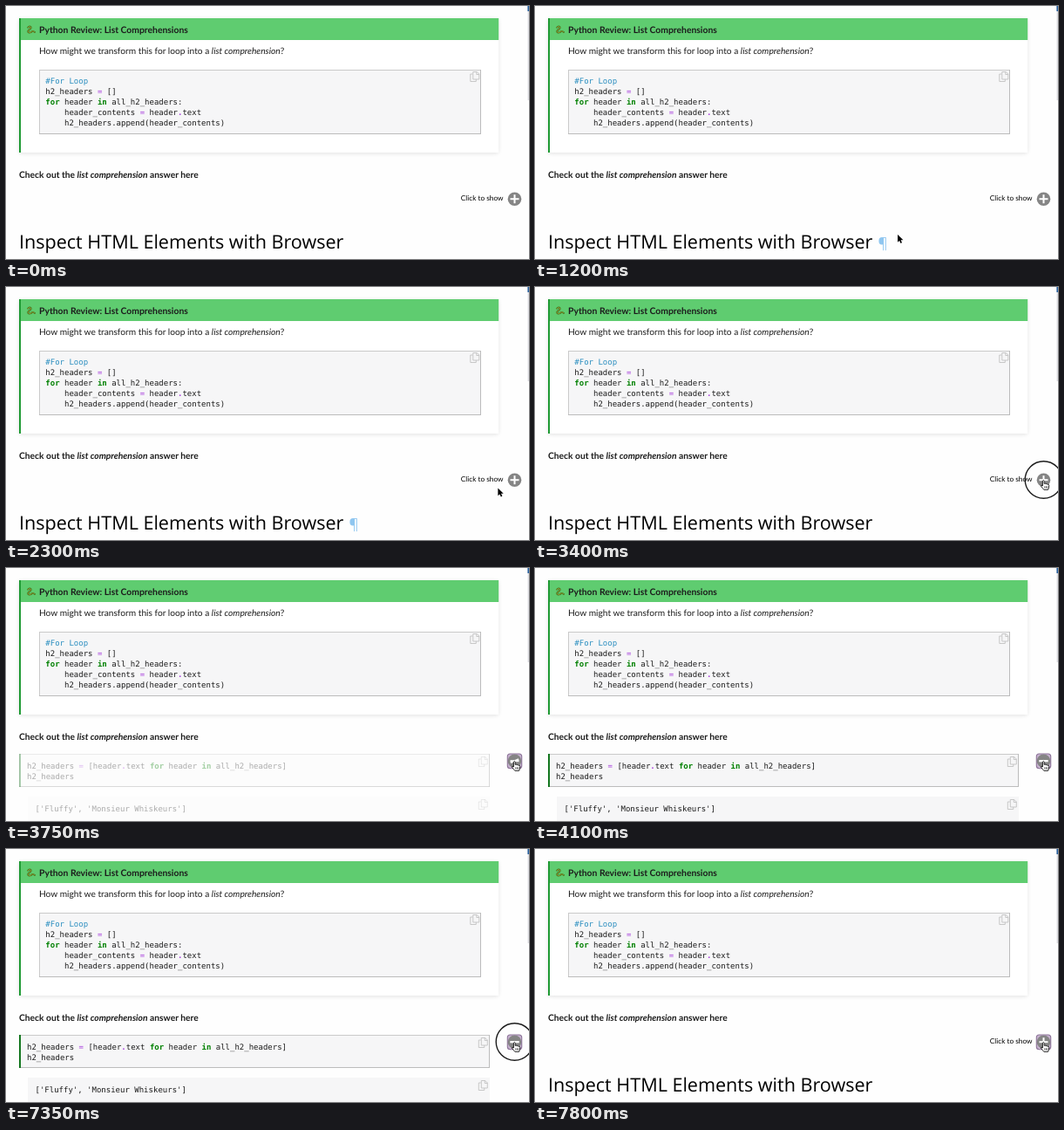
An HTML page with a canvas that plays this animation: 600 px wide and 290 px high, repeating every 8000 ms.

```html
<!DOCTYPE html>
<html lang="en">
<head>
<meta charset="utf-8">
<title>List comprehensions</title>
<style>
html, body { margin: 0; width: 100%; height: 100%; overflow: hidden; background: #fefefe; }
canvas { display: block; width: 600px; height: 290px; }
</style>
</head>
<body>
<canvas id="stage"></canvas>
<script>
const W = 600, H = 290, LOOP = 8000;
const canvas = document.getElementById('stage');
const ctx = canvas.getContext('2d');
const dpr = window.devicePixelRatio || 1;
canvas.width = W * dpr;
canvas.height = H * dpr;

const BODY = '10.2px Lato, sans-serif';
const STRONG = 'bold 10.28px Lato, sans-serif';
const TITLE = 'bold 10.36px Lato, sans-serif';
const SMALL = '8.26px Lato, sans-serif';
const MONO = '9px "DejaVu Sans Mono", monospace';
const HEAD = '21.57px "Open Sans", sans-serif';
const LINK = '17px "Open Sans", sans-serif';
const INK = '#1c1c1c', GREEN = '#008000', PURPLE = '#a83edc', COMMENT = '#2c8fc0';

// Times of the mouse button, and the pointer's path as [ms, x, y].
const OPEN = { down: 3400, up: 3550 };
const CLOSE = { down: 7350, up: 7500 };
const PATH = [
  [950, 406, 290], [1200, 416, 262], [1500, 436, 262], [1750, 464, 258],
  [2050, 525, 242], [2300, 564.3, 230.5], [2450, 577, 224], [2600, 581, 222]
];
const HAND_AT = 2650;

const clamp = v => Math.max(0, Math.min(1, v));
const ramp = (t, start, length) => clamp((t - start) / length);
const ease = v => v * v * (3 - 2 * v);

function rect(x, y, w, h, color) {
  ctx.fillStyle = color;
  ctx.fillRect(x, y, w, h);
}

// Writes [text, font, color] pieces one after another.
function write(x, y, ...pieces) {
  for (const [text, font, color = INK] of pieces) {
    ctx.font = font;
    ctx.fillStyle = color;
    ctx.fillText(text, x, y);
    x += ctx.measureText(text).width;
  }
}

// Writes a code line, coloring keywords, operators and comments.
function code(x, y, line) {
  if (line[0] === '#') return write(x, y, [line, MONO, COMMENT]);
  const pieces = line.split(/(\bfor\b|\bin\b|=|\.(?=text))/).map(s =>
    s === 'for' || s === 'in' ? [s, 'bold ' + MONO, GREEN]
      : s === '=' ? [s, MONO, PURPLE]
      : s === '.' ? [s, 'bold ' + MONO, PURPLE]
      : [s, MONO, INK]);
  write(x, y, ...pieces);
}

function panel(x, y, w, h) {
  rect(x, y, w, h, '#f6f6f7');
  ctx.strokeStyle = '#cacaca';
  ctx.lineWidth = 1;
  ctx.strokeRect(x + 0.5, y + 0.5, w - 1, h - 1);
  rect(x, y + h - 1, w, 1, '#bcbcbc');
  rect(x + w - 1, y, 1, h, '#bcbcbc');
}

function copyIcon(x, y) {
  ctx.strokeStyle = '#c2c2c2';
  ctx.lineWidth = 0.9;
  ctx.beginPath();
  ctx.moveTo(x + 3, y + 3);
  ctx.lineTo(x + 0.5, y + 3);
  ctx.lineTo(x + 0.5, y + 11.5);
  ctx.lineTo(x + 7, y + 11.5);
  ctx.lineTo(x + 7, y + 9);
  ctx.moveTo(x + 3.5, y + 0.5);
  ctx.lineTo(x + 8, y + 0.5);
  ctx.lineTo(x + 10.5, y + 3);
  ctx.lineTo(x + 10.5, y + 9);
  ctx.lineTo(x + 3.5, y + 9);
  ctx.closePath();
  ctx.moveTo(x + 7.5, y + 0.5);
  ctx.lineTo(x + 7.5, y + 3.5);
  ctx.lineTo(x + 10.5, y + 3.5);
  ctx.stroke();
}

function snake() {
  ctx.save();
  ctx.lineCap = 'round';
  for (const [color, width] of [['#3c6b1e', 1.9], ['#a8a832', 0.8]]) {
    ctx.strokeStyle = color;
    ctx.lineWidth = width;
    ctx.beginPath();
    ctx.moveTo(25.2, 24.6);
    ctx.bezierCurveTo(28, 22, 30, 24.5, 27.5, 26.5);
    ctx.bezierCurveTo(23, 29.5, 26, 31.5, 29, 30);
    ctx.bezierCurveTo(30, 28, 31.5, 29, 33, 30);
    ctx.stroke();
  }
  ctx.restore();
}

function page() {
  rect(0, 0, W, H, '#fefefe');
  rect(598.6, 0, 1.4, 108, '#dcdce0');
  rect(598.4, 0, 1.6, 6, '#2a62a0');

  ctx.save();
  ctx.shadowColor = 'rgba(0,0,0,.14)';
  ctx.shadowBlur = 5 * dpr;
  ctx.shadowOffsetY = 1.4 * dpr;
  rect(15, 14, 550.2, 154, '#fff');
  ctx.restore();
  rect(15, 14, 550.2, 25, '#5fcc70');
  rect(15, 14, 2, 154, '#1f9a34');
  snake();
  write(38, 30.6, ['Python Review: List Comprehensions', TITLE]);
  write(38, 55, ['How might we transform this for loop into a ', BODY],
    ['list comprehension', 'italic ' + BODY], ['?', BODY]);

  panel(38, 73, 507, 74);
  copyIcon(532.3, 75);
  ['#For Loop', 'h2_headers = []', 'for header in all_h2_headers:',
    '    header_contents = header.text',
    '    h2_headers.append(header_contents)'
  ].forEach((line, i) => code(45.3, 89.3 + i * 11.85, line));

  write(15, 197.4, ['Check out the ', STRONG],
    ['list comprehension', 'italic ' + STRONG], [' answer here', STRONG]);
}

function answer(alpha) {
  ctx.save();
  ctx.globalAlpha = alpha;
  panel(15, 213, 540, 38);
  rect(15, 213, 2, 38, '#14761f');
  copyIcon(541.8, 216);
  code(24, 230, 'h2_headers = [header.text for header in all_h2_headers]');
  code(24, 241.7, 'h2_headers');
  rect(25, 262, 530, 28, '#f6f6f7');
  copyIcon(541.8, 265);
  code(33.5, 278.8, "['Fluffy', 'Monsieur Whiskeurs']");
  ctx.restore();
}

function heading(linkAlpha) {
  write(15, 277.6, ['Inspect HTML Elements with Browser', HEAD, '#000']);
  if (!linkAlpha) return;
  ctx.save();
  ctx.globalAlpha = linkAlpha;
  write(393.4, 277.6, ['¶', LINK, '#8fc6f0']);
  ctx.restore();
}

// The vertical bar turns by 90 degrees to make a minus.
function button(turn, focused) {
  ctx.save();
  ctx.translate(583.5, 221.2);
  if (focused) {
    ctx.beginPath();
    ctx.roundRect(-8.2, -8.2, 16.4, 16.8, 3);
    ctx.fillStyle = '#c9b4d2';
    ctx.fill();
    ctx.strokeStyle = '#8b7397';
    ctx.lineWidth = 1.1;
    ctx.stroke();
  }
  ctx.beginPath();
  ctx.arc(0, 0, 7.8, 0, 7);
  ctx.fillStyle = '#858585';
  ctx.fill();
  rect(-5, -1, 10, 2, '#fff');
  ctx.rotate(turn * Math.PI / 2);
  rect(-1, -5, 2, 10, '#fff');
  ctx.restore();
}

function arrow(x, y) {
  ctx.save();
  ctx.translate(x, y);
  ctx.scale(0.88, 0.88);
  ctx.beginPath();
  [[0, 0], [0, 10], [2.3, 7.9], [3.9, 11.4], [5.6, 10.6], [4.1, 7.2], [7.2, 7.2]]
    .forEach(p => ctx.lineTo(...p));
  ctx.closePath();
  ctx.lineJoin = 'round';
  ctx.strokeStyle = '#fff';
  ctx.lineWidth = 1.5;
  ctx.stroke();
  ctx.fillStyle = '#000';
  ctx.fill();
  ctx.restore();
}

function hand(x, y) {
  ctx.save();
  ctx.translate(x, y);
  ctx.beginPath();
  ctx.moveTo(2.4, 7);
  ctx.lineTo(2.4, 1.2);
  ctx.quadraticCurveTo(3.3, -0.3, 4.2, 1.2);
  ctx.lineTo(4.2, 4.4);
  ctx.quadraticCurveTo(5.5, 3.6, 6.1, 4.8);
  ctx.quadraticCurveTo(7.4, 4.1, 7.9, 5.3);
  ctx.quadraticCurveTo(9.6, 4.9, 9.7, 6.4);
  ctx.quadraticCurveTo(9.8, 9, 8.6, 11.4);
  ctx.lineTo(3.8, 11.4);
  ctx.quadraticCurveTo(2.4, 9.6, 0.3, 7);
  ctx.quadraticCurveTo(0.4, 5.4, 2.4, 7);
  ctx.closePath();
  ctx.fillStyle = '#fff';
  ctx.fill();
  ctx.lineJoin = 'round';
  ctx.strokeStyle = '#111';
  ctx.lineWidth = 0.9;
  ctx.stroke();
  ctx.beginPath();
  for (const fx of [4.8, 6.3, 7.8]) {
    ctx.moveTo(fx, 7.2);
    ctx.lineTo(fx, 9.8);
  }
  ctx.lineWidth = 0.6;
  ctx.stroke();
  ctx.restore();
}

function pointer(t) {
  if (t < PATH[0][0]) return;
  if (t >= HAND_AT) return hand(580, 221);
  const i = PATH.findIndex(p => p[0] > t);
  if (i < 0) return arrow(581, 222);
  const [t0, x0, y0] = PATH[i - 1], [t1, x1, y1] = PATH[i];
  const k = (t - t0) / (t1 - t0);
  arrow(x0 + (x1 - x0) * k, y0 + (y1 - y0) * k);
}

function draw(t) {
  ctx.setTransform(dpr, 0, 0, dpr, 0, 0);
  ctx.textRendering = 'geometricPrecision';
  const open = t >= OPEN.up && t < CLOSE.up;
  page();
  if (open) {
    answer(ease(ramp(t, OPEN.up, 500)));
  } else {
    heading(ramp(t, 950, 150) * (1 - ramp(t, 2350, 150)));
    write(521.8, 223.4, ['Click to show', SMALL, '#000']);
  }
  const turn = ease(ramp(t, OPEN.up, 300)) - ease(ramp(t, CLOSE.up, 300));
  button(turn, t >= OPEN.up);
  pointer(t);
  if ([OPEN, CLOSE].some(c => t >= c.down && t < c.up)) {
    ctx.beginPath();
    ctx.arc(583.5, 221, 21.3, 0, 7);
    ctx.strokeStyle = '#1c1c1c';
    ctx.lineWidth = 1.4;
    ctx.stroke();
  }
}

const start = performance.now();
function tick() {
  draw((performance.now() - start) % LOOP);
  requestAnimationFrame(tick);
}
tick();
</script>
</body>
</html>
```
